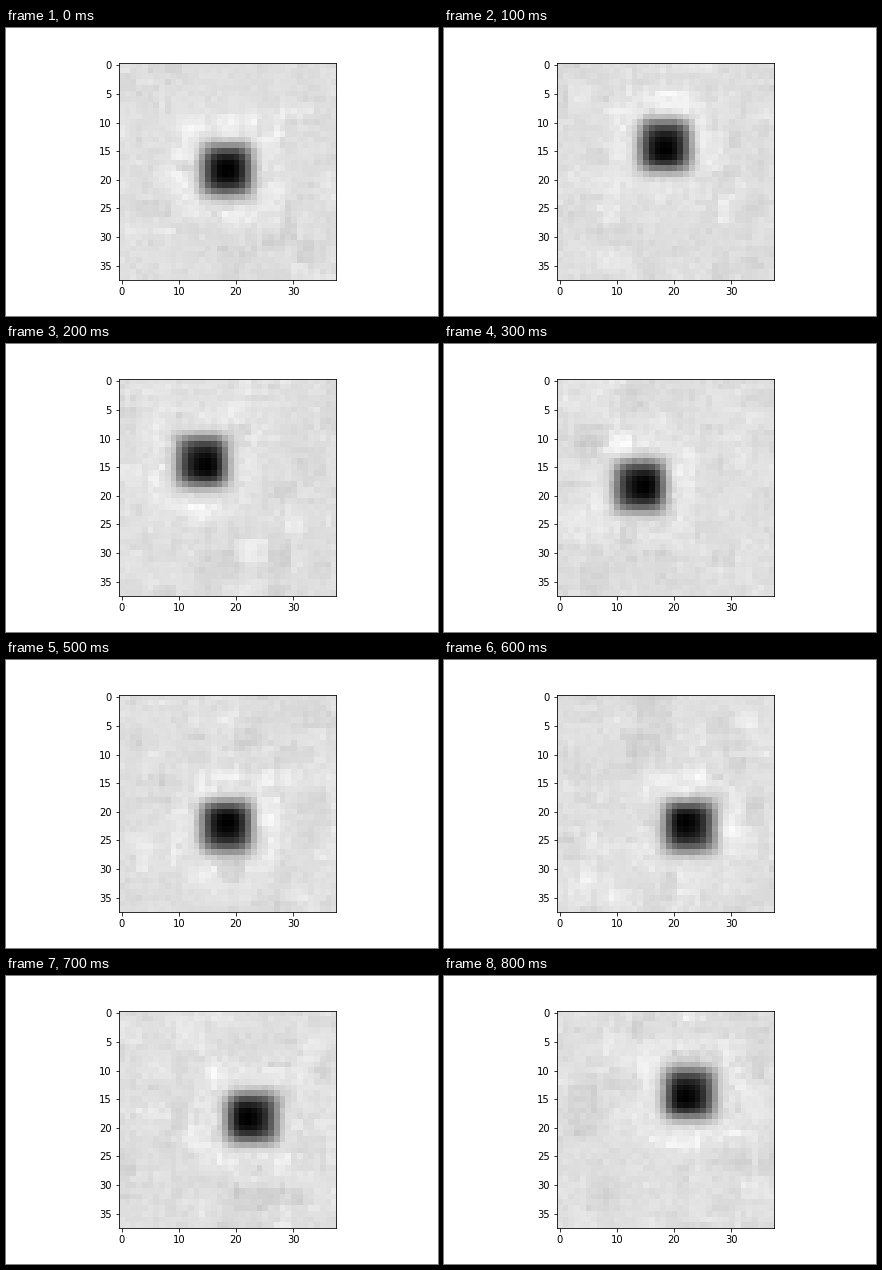
A matplotlib script that plays this animation: 432x288 px, repeating every 900 ms.

```python
import numpy as np
import matplotlib.pyplot as plt
from matplotlib.animation import FuncAnimation

SIZE = 38
STEPS = 9
STEP_MS = 100
BASE = 0.87         # mean grey of the background
MIDDLE = 18.3       # rest position of the spot, in cells
REACH = 4.3         # distance it moves along each axis
RADIUS = 4.5        # half-width of the spot
row, col = np.mgrid[0:SIZE, 0:SIZE]


def direction(step):
    """Start in the centre, then go counterclockwise round a square from the top."""
    if step == 0:
        return 0, 0
    angle = np.radians(-90 - 45 * (step - 1))
    return round(np.cos(angle)), round(np.sin(angle))


def texture(rng):
    """Blocky grey mottling made of overlapping faint boxes."""
    out = rng.normal(0, 0.009, (SIZE, SIZE))
    for _ in range(300):
        x, y = rng.integers(-4, SIZE, 2)
        w, h = rng.integers(1, 7, 2)
        box = (col >= x) & (col < x + w) & (row >= y) & (row < y + h)
        out[box] += rng.normal(0, 0.0125)
    return out - out.mean()


def field(step):
    """Dark soft square with a pale rim on a mottled background."""
    dx, dy = direction(step)
    x = col - MIDDLE - REACH * dx
    y = row - MIDDLE - REACH * dy
    dark = np.exp(-(x / RADIUS) ** 4 - (y / RADIUS) ** 4)

    # The darkest point lags behind, towards the middle of the picture.
    core = np.exp(-((x + dx) ** 2 + (y + dy) ** 2) / 16)
    dark *= 0.72 + 0.28 * core

    dist = (x ** 4 + y ** 4) ** 0.25
    rim = np.exp(-((dist - 8) / 2) ** 2)
    grain = texture(np.random.default_rng(step + 1))
    pale = BASE + 0.035 * rim + grain * (1 + 0.5 * rim)
    return np.clip(pale * (1 - dark / dark.max()), 0, 1)


fields = [field(step) for step in range(STEPS)]

plt.rcParams.update({"font.family": "DejaVu Sans", "font.size": 10})
fig = plt.figure(figsize=(6, 4), dpi=72, facecolor="white")
fig.subplots_adjust(left=0.125, right=0.9, bottom=0.125, top=0.88)
ax = fig.add_subplot()
image = ax.imshow(fields[0], cmap="gray", vmin=0, vmax=1,
                  interpolation="nearest")
ax.set_xticks(range(0, SIZE, 10))
ax.set_yticks(range(0, SIZE, 5))


def draw(step):
    image.set_data(fields[step])
    return (image,)


anim = FuncAnimation(fig, draw, frames=STEPS, interval=STEP_MS,
                     repeat=True, repeat_delay=0)
plt.show()
```
